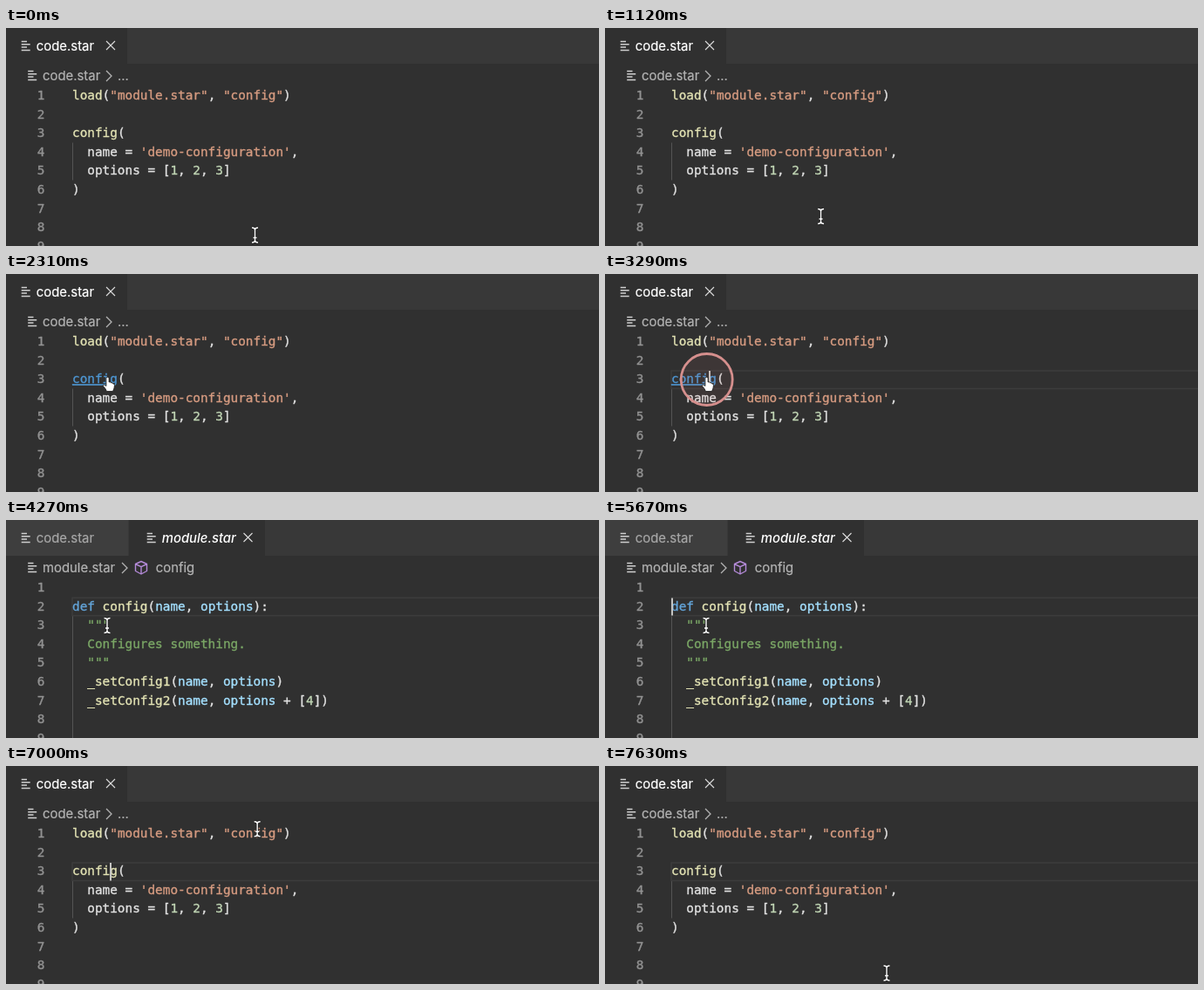
Recreate the animation shown at these times as an HTML page. Size 680x250 px, loop 7.84 s.

```html
<!DOCTYPE html>
<html lang="en">
<head>
<meta charset="utf-8">
<title>Go to definition</title>
<style>
  html, body { margin: 0; width: 100%; height: 100%; overflow: hidden; background: #303030; }
  svg { display: block; width: 680px; height: 250px; }
  /* a thin stroke in the text colour gives the heavier weight */
  text, tspan { white-space: pre; fill: currentColor; stroke: currentColor; stroke-width: .35px; }
  .ui { font: 14.88px Inter, "Open Sans", sans-serif; color: #b4b4b4; stroke-width: .2px; }
  .code, .nums { font: 14.36px "DejaVu Sans Mono", "Liberation Mono", monospace; color: #e2e2e2; }
  .nums { color: #939393; text-anchor: end; }
  .title { color: #fff; }
  .dim { color: #a6a6a6; }
  .italic { font-style: italic; font-weight: 500; stroke-width: 0; }
  .fn { color: #e3e3b4; }
  .str { color: #d69b80; }
  .num { color: #c0d5b4; }
  .key { color: #63a4d8; }
  .arg { color: #a4e0ff; }
  .doc { color: #7aa665; }
  .link { color: #4e96d2; text-decoration: underline; }
  .line { fill: none; stroke: #3c3c3c; stroke-width: 1.5; }
  .guide { stroke: #545454; }
  .caret { fill: #c4c4c2; }
  .icon { fill: none; stroke: #cfcfcf; stroke-width: 1.5; }
  .cross { stroke: #dcdcdc; stroke-width: 1.1; }
  .chevron { stroke: #b4b4b4; stroke-width: 1.3; }
  .cube { stroke: #b48ad8; stroke-width: 1.4; stroke-linejoin: round; }
  .beam { fill: none; stroke: #fff; stroke-width: 1.4; }
  .beam .edge { stroke: #1c1c1c; stroke-width: 3; }
</style>
</head>
<body>
<svg viewBox="0 0 680 250">
  <defs>
    <path id="file" class="icon" d="M.7 .5h6.3M.7 3.8h10M.7 7.1h6.3M.7 10.4h10"/>
    <path id="cross" class="icon cross" d="M-5-5 5 5M5-5-5 5"/>
    <path id="chevron" class="icon chevron" d="M-3-6 3 0-3 6"/>
    <path id="cube" class="icon cube" d="M0-7 6.5-4V4L0 7.5-6.5 4V-4ZM-6.5-4 0-.8 6.5-4M0-.8V7.5"/>
    <path id="ibeam" d="M-3.5-8.5Q0-8.5 0-6V6Q0 8.5-3.5 8.5M3.5-8.5Q0-8.5 0-6M3.5 8.5Q0 8.5 0 6M-2 3H2"/>
  </defs>
  <rect width="680" height="250" fill="#303030"/>
  <rect width="680" height="41" fill="#383838"/>
  <g class="nums" id="nums"></g>

  <g id="caller">
    <rect width="139" height="41" fill="#303030"/>
    <use href="#file" x="17" y="15"/>
    <text class="ui title" x="34.8" y="25.5">code.star</text>
    <use href="#cross" x="120" y="20"/>
    <use href="#file" x="24.5" y="49"/>
    <text class="ui" x="42" y="60">code.star</text>
    <use href="#chevron" x="118" y="55"/>
    <text class="ui" x="128" y="60">...</text>
    <path class="guide" d="M76.5 131.5V174.5"/>
    <rect class="line" id="line" x="76" y="111" width="610" height="20.5"/>
    <g class="code" data-rows>
      <text><tspan class="fn">load</tspan>(<tspan class="str">"module.star"</tspan>, <tspan class="str">"config"</tspan>)</text>
      <text></text>
      <text><tspan class="fn" id="call">config</tspan>(</text>
      <text>  name = <tspan class="str">'demo-configuration'</tspan>,</text>
      <text>  options = [<tspan class="num">1</tspan>, <tspan class="num">2</tspan>, <tspan class="num">3</tspan>]</text>
      <text>)</text>
    </g>
    <rect class="caret" id="callCaret" x="119" y="111" width="2" height="20.5"/>
  </g>

  <g id="module">
    <rect width="140" height="41" fill="#3e3e3e"/>
    <rect x="141" width="156" height="41" fill="#303030"/>
    <use href="#file" x="17" y="15"/>
    <text class="ui dim" x="34.8" y="25.5">code.star</text>
    <use href="#file" x="161" y="15"/>
    <text class="ui title italic" x="178.7" y="25.5">module.star</text>
    <use href="#cross" x="277.5" y="20"/>
    <use href="#file" x="24.5" y="49"/>
    <text class="ui" x="42" y="60">module.star</text>
    <use href="#chevron" x="136" y="55"/>
    <use href="#cube" x="155" y="54.5"/>
    <text class="ui" x="171.8" y="60">config</text>
    <path class="guide" d="M76.5 110V250"/>
    <rect class="line" x="76" y="89.2" width="610" height="20.5"/>
    <g class="code" data-rows>
      <text></text>
      <text><tspan class="key">def</tspan> <tspan class="fn">config</tspan>(<tspan class="arg">name</tspan>, <tspan class="arg">options</tspan>):</text>
      <text class="doc">  """</text>
      <text class="doc">  Configures something.</text>
      <text class="doc">  """</text>
      <text>  <tspan class="fn">_setConfig1</tspan>(<tspan class="arg">name</tspan>, <tspan class="arg">options</tspan>)</text>
      <text>  <tspan class="fn">_setConfig2</tspan>(<tspan class="arg">name</tspan>, <tspan class="arg">options</tspan> + [<tspan class="num">4</tspan>])</text>
    </g>
    <rect class="caret" id="defCaret" x="76" y="89.5" width="2" height="20"/>
  </g>

  <circle id="ring" cx="116.7" cy="121" fill="#d08080" fill-opacity=".08" stroke="#d58f8d" stroke-width="2.8"/>
  <g id="pointer">
    <g id="beam" class="beam"><use class="edge" href="#ibeam"/><use href="#ibeam"/></g>
    <path id="arrow" d="M0 0V13L3 10 5 14.5 7 13.6 5 9.3H9Z" fill="#111" stroke="#fff"/>
    <path id="hand" transform="translate(.5 -2)" fill="#fff" stroke="#222" stroke-width=".9"
      d="M-1.6.8A1.6 1.6 0 0 1 1.6.8V5Q3.8 4 3.8 5.8 6 5 6 6.8 8 6.4 8 8.4 8 12 6 15.6H-1Q-2 12.5-5.5 9.1-4.7 7-1.6 9.4Z"/>
  </g>
</svg>
<script>
const LOOP = 7840, TICK = 70, ROW = 21.62, TOP = 82;
const OPEN = 3360, CLOSE = 6790, PRESS = 2730, FOCUS = 2940, BLINK = 490;
const $ = id => document.getElementById(id);
const show = (id, on) => $(id).setAttribute('visibility', on ? 'inherit' : 'hidden');
const ramp = (t, a, b) => Math.min(1, Math.max(0, (t - a) / (b - a)));
const ease = p => p * p * (3 - 2 * p);

// time, x, y
const path = [
  [980, 285.5, 237.5], [1470, 94, 129], [1750, 117, 122], [1820, 113, 121.5],
  [1890, 116, 121], [5670, 116, 121], [6510, 278, 24],
  [6720, 278, 24], [7630, 323, 237.5]
];

for (let n = 1; n <= 9; n++) {
  const label = document.createElementNS('http://www.w3.org/2000/svg', 'text');
  label.textContent = n;
  label.setAttribute('x', 44.5);
  label.setAttribute('y', TOP + (n - 1) * ROW);
  $('nums').append(label);
}
for (const block of document.querySelectorAll('[data-rows]'))
  [...block.children].forEach((row, i) => {
    row.setAttribute('x', 76);
    row.setAttribute('y', TOP + i * ROW);
  });

function place(t) {
  const i = path.findIndex(p => p[0] > t);
  if (i === 0) return path[0].slice(1);
  if (i < 0) return path[path.length - 1].slice(1);
  const [a, x, y] = path[i - 1], [b, u, v] = path[i];
  const p = ease(ramp(t, a, b));
  return [x + (u - x) * p, y + (v - y) * p];
}

function draw(t) {
  const inModule = t >= OPEN && t < CLOSE;
  show('module', inModule);
  show('caller', !inModule);
  show('line', t >= FOCUS);
  show('callCaret', (t >= FOCUS && t < FOCUS + BLINK) || (t >= CLOSE && t < CLOSE + BLINK));
  show('defCaret', Math.floor((t - OPEN) / BLINK) % 2 === 0);
  $('call').setAttribute('class', t >= 2030 && t < OPEN ? 'link' : 'fn');

  const [x, y] = place(t);
  const hand = (t >= 2100 && t < 3780) || (y < 41 && t < CLOSE);
  const arrow = !hand && y < 66;
  $('pointer').setAttribute('transform', `translate(${x} ${y})`);
  show('hand', hand);
  show('arrow', arrow);
  show('beam', !hand && !arrow);

  show('ring', t >= PRESS && t < 3640);
  $('ring').setAttribute('r', 22 + 1.5 * ramp(t, PRESS, 2800) + 6 * ramp(t, 2870, 3220));
  $('ring').setAttribute('opacity', (.5 + .5 * ramp(t, PRESS, 2800)) * (1 - ramp(t, 3290, 3640)));
}

let start;
function loop(now) {
  start ??= now;
  const t = (now - start) % LOOP;
  draw(Math.floor(t / TICK) * TICK);
  requestAnimationFrame(loop);
}
draw(0);
requestAnimationFrame(loop);
</script>
</body>
</html>
```
